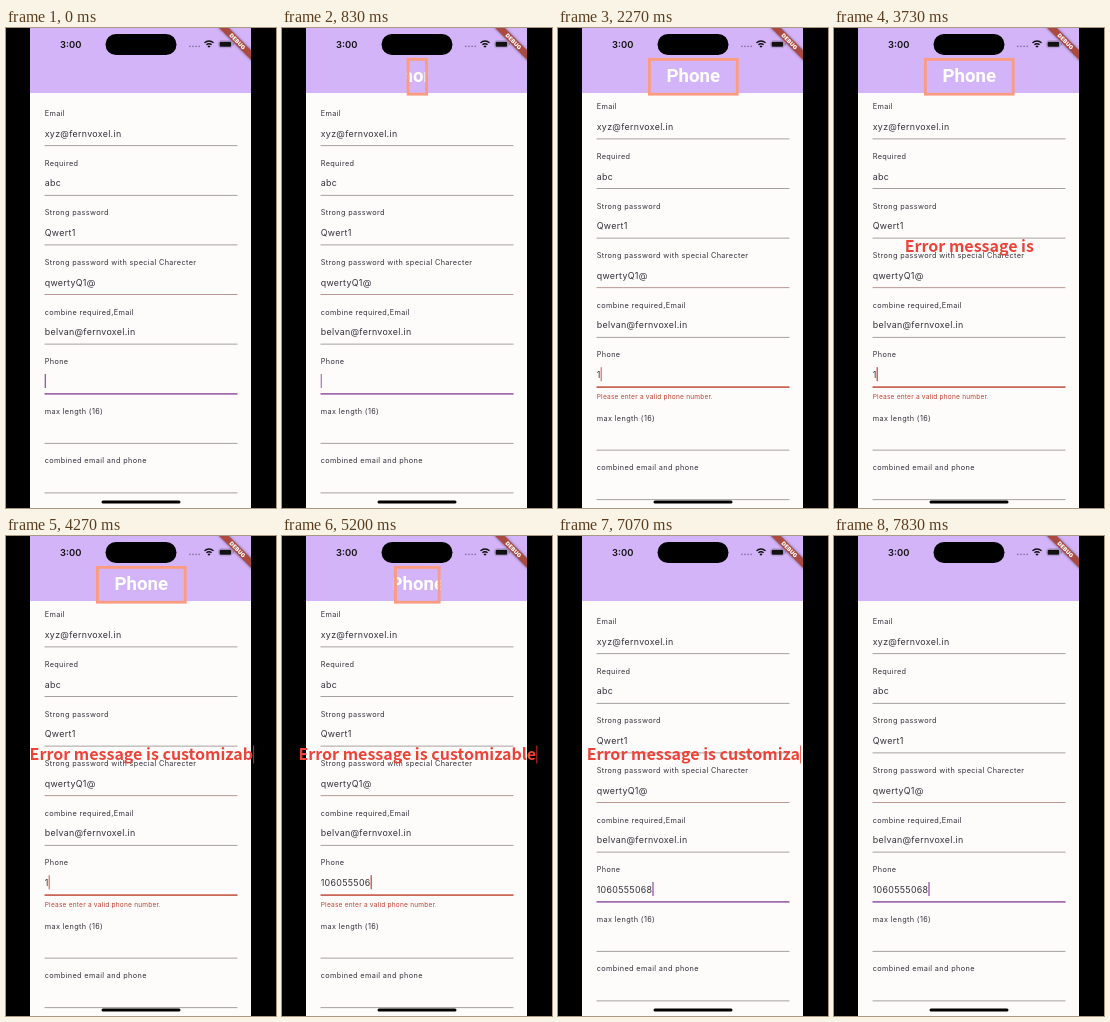
Recreate the animation shown at these times as an HTML page with a canvas. Size 270 px wide and 480 px high, loop 7860 ms.

```html
<!DOCTYPE html>
<html lang="en">
<head>
<meta charset="utf-8">
<title>Form validation demo</title>
<style>
html, body { margin: 0; width: 100%; height: 100%; overflow: hidden; background: #000; }
canvas { display: block; width: 270px; height: 480px; }
</style>
</head>
<body>
<canvas id="stage"></canvas>
<script>
const W = 270, H = 480, LOOP = 7860;
const LEFT = 24, RIGHT = 245, MID = 135.3;
const ROW = 49.6, TEXT_X = 38.7;
const INK = '#33313a', PURPLE = '#8c4a9c', RED = '#bf4230';
const UI = 'Inter, Roboto, sans-serif';
const CAPTION = 'Error message is customizable';
const CAPTION_FONT = '700 16px "Noto Sans CJK SC", "Noto Sans CJK JP", "Noto Sans CJK", "Open Sans", sans-serif';
const PHONE = '1060555068';
const PHONE_ROW = 5;
const ERROR_ON = 1700, LAST_KEY = 5700, ERROR_FADE = 167;

const fields = [
  ['Email', 'xyz@fernvoxel.in'],
  ['Required', 'abc'],
  ['Strong password', 'Qwert1'],
  ['Strong password with special Charecter', 'qwertyQ1@'],
  ['combine required,Email', 'belvan@fernvoxel.in'],
  ['Phone', ''],
  ['max length (16)', ''],
  ['combined email and phone', '']
];

const canvas = document.getElementById('stage');
const ctx = canvas.getContext('2d');
const dpr = window.devicePixelRatio || 1;
canvas.width = W * dpr;
canvas.height = H * dpr;

const clamp = (v, a = 0, b = 1) => Math.min(b, Math.max(a, v));
const ramp = (t, from, to) => clamp((t - from) / (to - from));
const smooth = p => p * p * (3 - 2 * p);

function rect(x, y, w, h, color) {
  ctx.fillStyle = color;
  ctx.fillRect(x, y, w, h);
}

function pill(x, y, w, h, r, color) {
  ctx.fillStyle = color;
  ctx.beginPath();
  ctx.roundRect(x, y, w, h, r);
  ctx.fill();
}

function text(str, x, y, font, color, spacing = 0, align = 'left') {
  ctx.font = font;
  ctx.letterSpacing = spacing + 'px';
  ctx.textAlign = align;
  ctx.fillStyle = color;
  ctx.fillText(str, x, y);
  return ctx.measureText(str).width;
}

function digitCount(t) {
  if (t < ERROR_ON) return 0;
  if (t < 4560) return 1;
  if (t >= LAST_KEY) return 10;
  return 2 + clamp(Math.floor((t - 4830) / 55) + 1, 0, 7);
}

// Solid for half a second, fades out, rests, fades in; every key restarts it.
function cursorAlpha(t) {
  let start = -130;
  if (t >= LAST_KEY) start = 5712;
  else if (t >= 4560) start = Math.min(t, 5160);
  else if (t >= ERROR_ON) start = Math.min(t, 1730);
  const u = ((t - start) % 1000) / 1000;
  if (u < 0.5) return 1;
  return u < 0.75 ? 1 - ramp(u, 0.5, 0.65) : ramp(u, 0.85, 1);
}

function drawForm(t) {
  const shown = t >= ERROR_ON && t < LAST_KEY + ERROR_FADE;
  const fade = ramp(t, ERROR_ON, ERROR_ON + ERROR_FADE) - ramp(t, LAST_KEY, LAST_KEY + ERROR_FADE);
  const shift = shown ? 6.8 : 0;
  const accent = fade > 0.5 ? RED : PURPLE;

  fields.forEach(([label, value], i) => {
    const y = 85.3 + ROW * i + (i > PHONE_ROW ? shift : -shift);
    const active = i === PHONE_ROW;
    text(label, TEXT_X, y + 2.8, '400 7.3px ' + UI, INK, 0.37);
    const str = active ? PHONE.slice(0, digitCount(t)) : value;
    const w = text(str, TEXT_X, y + 23.4, '400 8.9px ' + UI, INK, 0.3);
    if (active) {
      ctx.globalAlpha = cursorAlpha(t);
      rect(TEXT_X + w, y + 12.7, 1.2, 14, accent);
      ctx.globalAlpha = fade;
      text('Please enter a valid phone number.', TEXT_X, y + 44.4, '400 6.55px ' + UI, RED, 0.22);
      ctx.globalAlpha = 1;
      rect(38.5, y + 31.9, 193, 1.4, accent);
    } else {
      rect(38.5, y + 32, 193, 0.8, i === 3 ? '#a8807a' : '#8f8b88');
    }
  });
}

function drawStatus() {
  text('3:00', 54, 20, '600 9.4px ' + UI, '#111');
  pill(99.5, 6, 71, 21, 10.5, '#000');
  for (let i = 0; i < 4; i++) pill(183 + i * 3.1, 17.4, 1.8, 1.8, 0.9, '#8d72a8');

  ctx.strokeStyle = '#111';
  ctx.lineWidth = 1.4;
  for (const r of [3.6, 6.4]) {
    ctx.beginPath();
    ctx.arc(203, 19.4, r, -Math.PI * 0.75, -Math.PI * 0.25);
    ctx.stroke();
  }
  ctx.fillStyle = '#111';
  ctx.beginPath();
  ctx.moveTo(203, 19.8);
  ctx.arc(203, 19.8, 2.2, -Math.PI * 0.75, -Math.PI * 0.25);
  ctx.fill();

  ctx.strokeStyle = '#9a83b4';
  ctx.lineWidth = 0.6;
  ctx.beginPath();
  ctx.roundRect(212.6, 12.7, 13.6, 7, 2.2);
  ctx.stroke();
  pill(213.6, 13.7, 11.6, 5, 1.3, '#111');
  rect(227, 15.1, 0.9, 2.2, '#9a83b4');
}

function drawBanner() {
  ctx.save();
  ctx.translate(RIGHT, 0);
  ctx.rotate(Math.PI / 4);
  ctx.shadowColor = 'rgba(0,0,0,.45)';
  ctx.shadowBlur = 3 * dpr;
  rect(-24, 15.7, 48, 6.8, '#ab4a40');
  ctx.shadowColor = 'transparent';
  text('DEBUG', 0, 21.1, '900 5.6px ' + UI, '#fff', 0.1, 'center');
  ctx.restore();
}

// A frame that opens sideways from its centre and closes the same way.
function drawCallout(t) {
  const p = t < 3000 ? ramp(t, 0, 1570) : 1 - ramp(t, 4800, 6370);
  if (p < 0.03) return;
  const w = Math.max(2, 91 * Math.pow(p, 2.25));
  const h = 38 * clamp(p / 0.2);
  const x = MID - w / 2, y = 48.8 - h / 2;
  const edge = Math.min(3, w / 2, h / 2);
  ctx.save();
  ctx.beginPath();
  ctx.rect(x, y, w, h);
  ctx.clip();
  text('Phone', MID, 54.2, '700 18.6px Roboto, Inter, sans-serif', '#fff', 0, 'center');
  ctx.strokeStyle = '#fb9b80';
  ctx.lineWidth = edge;
  ctx.strokeRect(x + edge / 2, y + edge / 2, w - edge, h - edge);
  ctx.restore();
}

function drawCaption(t) {
  const total = CAPTION.length;
  const typed = Math.floor(total * smooth(ramp(t, 2600, 4570)) + 0.2);
  const erased = Math.floor(total * Math.pow(ramp(t, 6800, 7830), 1.5));
  const n = clamp(typed - erased, 0, total);
  if (!n) return;
  const str = CAPTION.slice(0, n).trimEnd();
  const color = '#ec4338';
  const w = text(str, MID, 223.6, CAPTION_FONT, color, 0, 'center');
  if ((t + 130) % 1000 < 500) rect(MID + w / 2 + 0.3, 209.5, 0.8, 18, color);
}

function draw(t) {
  ctx.setTransform(dpr, 0, 0, dpr, 0, 0);
  rect(0, 0, W, H, '#000');
  ctx.save();
  ctx.beginPath();
  ctx.rect(LEFT, 0, RIGHT - LEFT, H);
  ctx.clip();
  rect(LEFT, 0, RIGHT - LEFT, H, '#fefcfb');
  drawForm(t);
  rect(LEFT, 0, RIGHT - LEFT, 65, '#d3b4f9');
  drawStatus();
  drawBanner();
  pill(95.5, 472.4, 79, 3, 1.5, '#000');
  ctx.restore();
  drawCallout(t);
  drawCaption(t);
}

function loop() {
  draw(performance.now() % LOOP);
  requestAnimationFrame(loop);
}
loop();
</script>
</body>
</html>
```
